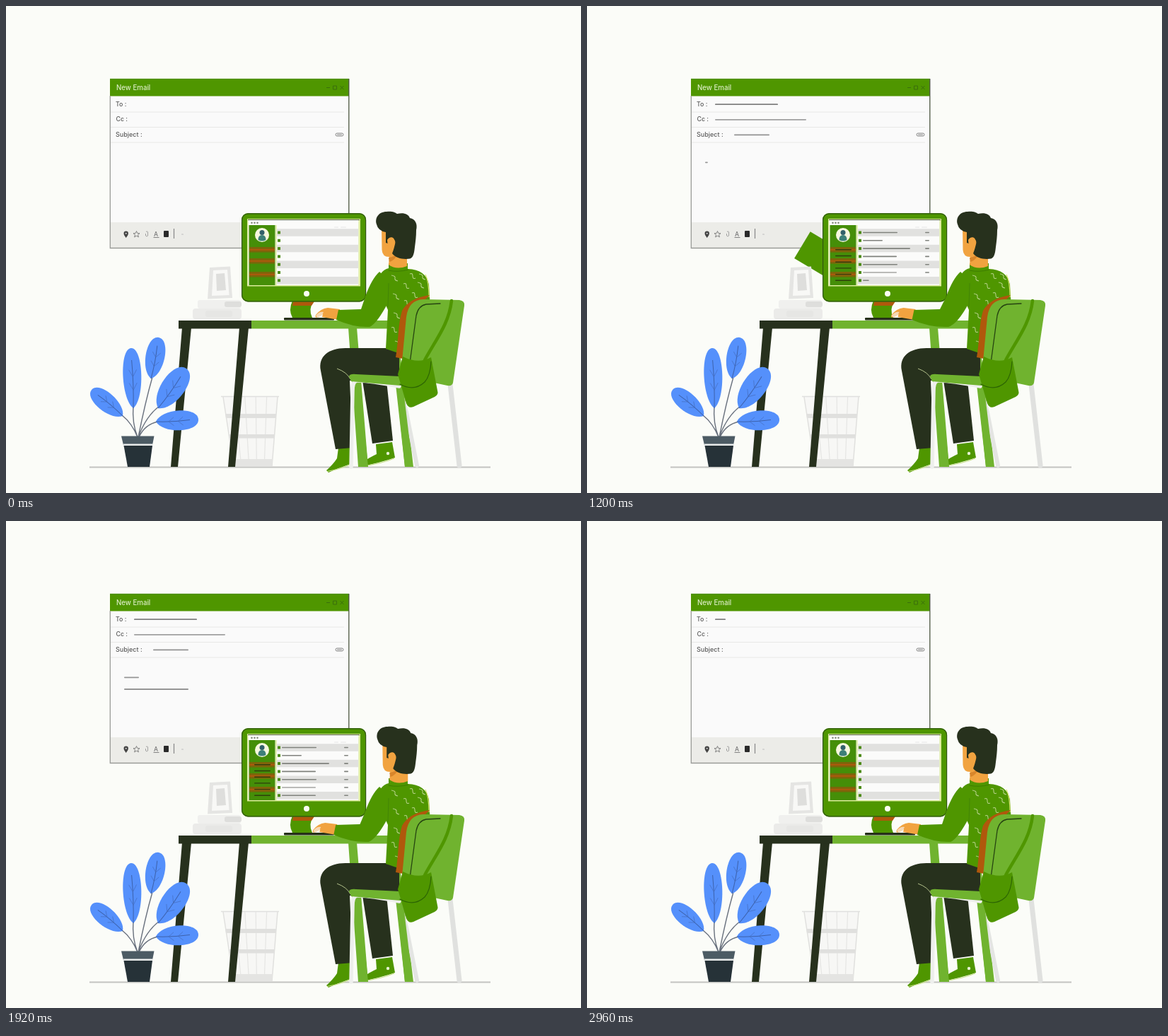
Write an HTML page with a canvas that moves like this. It is 813x689 px and loops after 3040 ms.

```html
<!DOCTYPE html>
<html lang="en">
<head>
<meta charset="utf-8">
<title>New Email</title>
<style>
html, body { margin: 0; width: 100%; height: 100%; overflow: hidden; background: #fbfcf8; }
canvas { display: block; width: 813px; height: 689px; }
</style>
</head>
<body>
<canvas id="stage" width="813" height="689"></canvas>
<script>
const ctx = document.getElementById('stage').getContext('2d');
const LOOP = 3040, STEP = 80, RESET = 2560;
const GREEN = '#4f9600', LIME = '#70b32f', DARK = '#27311d', SKIN = '#f1a340',
      BROWN = '#b0580c', PAPER = '#fbfcf8';

const clamp = v => Math.max(0, Math.min(1, v));
const prog = (t, from, to) => clamp((t - from) / (to - from));

// Smooth interpolation through [time, value] pairs
function track(t, keys) {
  for (let i = 1; i < keys.length; i++) {
    const [t0, a] = keys[i - 1], [t1, b] = keys[i];
    if (t <= t1) {
      const p = prog(t, t0, t1);
      return a + (b - a) * p * p * (3 - 2 * p);
    }
  }
  return keys[keys.length - 1][1];
}

function fill(d, color) {
  ctx.fillStyle = color;
  ctx.fill(new Path2D(d));
}
function stroke(d, color, width = 1) {
  ctx.strokeStyle = color;
  ctx.lineWidth = width;
  ctx.stroke(new Path2D(d));
}
function box(x, y, w, h, color, r = 0) {
  ctx.fillStyle = color;
  ctx.beginPath();
  ctx.roundRect(x, y, w, h, r);
  ctx.fill();
}
function disc(x, y, r, color) {
  ctx.fillStyle = color;
  ctx.beginPath();
  ctx.arc(x, y, r, 0, Math.PI * 2);
  ctx.fill();
}
function label(s, x, y, size, color) {
  ctx.font = `500 ${size}px Inter, "Open Sans", sans-serif`;
  ctx.fillStyle = color;
  ctx.fillText(s, x, y);
}
function dash(x, y, w, color = '#858585', h = 1.8) {
  if (w > 0.5) box(x, y - h / 2, w, h, color, h / 2);
}

function drawWindow(t) {
  box(147, 103, 338, 239, '#fafafa');
  box(147, 306, 338, 36, '#ecece8');
  box(147, 103, 338, 24.5, GREEN);
  stroke('M147 103.3H485', '#478a04', 1);
  stroke('M147.3 127V342.5H485', '#9a9b98', 1.3);
  stroke('M484.8 103V342', '#4a5540', 1.3);
  for (const y of [150, 171.5, 193]) stroke(`M148 ${y}H478`, '#e8e8e7', 1);

  label('New Email', 156, 118.5, 9.7, '#dcedc6');
  label('To :', 155, 141.5, 8.8, '#5c5c5c');
  label('Cc :', 155.5, 163, 8.8, '#5c5c5c');
  label('Subject :', 155, 185, 9, '#5c5c5c');
  stroke('M453 115.5h5M462.5 113h5v5h-5zM472.5 113l5 5m0-5l-5 5', '#3a6f0d', 1);
  stroke('M468 180h7a2 2 0 0 1 0 4h-7a2 2 0 0 1 0-4M468 182h7', '#888', 1);

  // toolbar icons
  fill('M169.7 328q-3.2-4-3.2-6.2a3.2 3.2 0 0 1 6.4 0q0 2.2-3.2 6.2z', '#444');
  disc(169.7, 321.7, 1, '#ddd');
  stroke('M184.5 318.5l1.3 3 3.2.2-2.5 2 .9 3.2-2.9-1.7-2.9 1.7.9-3.2-2.5-2 3.2-.2z', '#777', 0.9);
  stroke('M198 319.5q2-1.5 2.5.5v5q-1.5 2-3 0v-3', '#999', 0.9);
  label('A', 209, 325.5, 8.5, '#777');
  stroke('M208.5 327.5h8', '#777', 0.9);
  box(223, 318, 7, 9, '#2a2a2a', 1);
  stroke('M237.5 315V329', '#888', 1.2);
  dash(248, 323, 3, '#bbb', 1.2);

  const on = t < RESET;
  const to = on ? 89 * prog(t, 350, 560) : t >= 2800 ? 15 : 0;
  dash(181, 139.2, to, '#7f7f7f');
  if (!on) return;
  dash(181, 160.8, 129 * prog(t, 600, 830), '#a0a0a0');
  dash(t < 960 ? 205 : 208, 182.3, 50 * prog(t, 810, 1200), '#929292');
  dash(167, 221.3, 21 * prog(t, 1155, 1400), '#959595');
  dash(167, 238, 91 * prog(t, 1440, 1835), '#959595');
}

function card(x, y, w, h, angle, paint) {
  ctx.save();
  ctx.beginPath();
  ctx.rect(83, 150, 630, 400);
  ctx.clip();
  ctx.translate(x, y);
  ctx.rotate(angle);
  paint(w, h);
  ctx.restore();
}

function drawCards(t) {
  if (t >= 440 && t < 960) {
    const p = (t - 480) / 400;
    card(474 + 251 * p, 347 - 52 * p, 60, 45, -Math.PI / 4 * clamp(p), (w, h) => {
      box(-w / 2, -h / 2, w, h, PAPER);
      ctx.strokeStyle = '#c5d3aa';
      ctx.lineWidth = 1.2;
      ctx.strokeRect(-w / 2, -h / 2, w, h);
    });
    if (t >= 800) dash(704 - (880 - t) * 0.63, 291.5, 9, '#cfd2cc', 1.2);
  }
  if (t >= 1080 && t < 1600) {
    const p = (t - 1200) / 320;
    card(331 - 221 * p, 354 + 11 * p, 62, 44, 0.54, (w, h) => box(-w / 2, -h / 2, w, h, GREEN));
  }
}

function drawRoom() {
  stroke('M118 652.5H685', '#c3c4c1', 2);
  // books and picture frame
  box(264, 428, 69, 15, '#ebebe9', 4);
  box(271, 416, 61, 12, '#f0f0ee', 3);
  box(309, 418, 24, 8, '#dededc', 3);
  box(282, 431, 38, 9, '#e6e6e4', 3);
  fill('M288 370L317 368.5 320 413 285 414.5z', '#e5e5e3');
  fill('M293 374L313 373 315.5 409 291 410z', '#f8f8f6');
  fill('M297 379L309 378 311 402 298 403z', '#dededc');

  // waste basket
  fill('M307 553H384L376 651H323z', '#f7f7f5');
  stroke('M304 552.5H386M307 553L322 651H376L384 553', '#e0e0de', 1.5);
  for (let i = 1; i < 5; i++) stroke(`M${307 + 15.4 * i} 553L${322 + 10.8 * i} 651`, '#e5e5e3', 1.2);
  fill('M310 577H382L381.5 583H311zM315 606H380L379.5 611.5H316z', '#e0e0de');
  fill('M320 641H377L376 651H322z', '#e4e4e2');

  // desk
  fill('M249 455H262L243 652H233zM330 455H343L324 652H314z', DARK);
  fill('M484 455H496L512 652H498zM542 455H553L576 652H564z', LIME);
  box(244, 445, 103, 11.5, DARK);
  box(347, 445, 208, 11.5, LIME);
}

function leaf(x0, y0, x1, y1, w) {
  const dx = x1 - x0, dy = y1 - y0, n = Math.hypot(dx, dy), k = w * 0.69;
  ctx.save();
  ctx.translate(x0, y0);
  ctx.rotate(Math.atan2(dy, dx));
  fill(`M0 0C${n * .16} ${-k} ${n} ${-k} ${n} 0C${n} ${k} ${n * .16} ${k} 0 0`, '#5590fb');
  stroke(`M0 0Q${n * .4} 2 ${n * .8} 0`, '#3d62ac', 1);
  for (const f of [0.3, 0.52])
    stroke(`M${n * f} 1l${n * .12} ${-w * .22}M${n * f} 1l${n * .12} ${w * .22}`, '#456fc2', 0.7);
  ctx.restore();
}

function drawPlant() {
  stroke('M186 610Q178 590 164 579M186 610Q178 590 180 565M187 610Q197 560 207 525M187 610Q198 580 217 566M188 610Q196 592 215 588', '#69717e', 1.4);
  leaf(165, 580, 121, 543, 25);
  leaf(180, 569, 177, 484, 25);
  leaf(205, 527, 216, 469, 26);
  leaf(215, 569, 255, 513, 32);
  leaf(212, 588, 272, 585, 27);
  fill('M163 608.5H209.5L207 621H166z', '#4c5b64');
  fill('M166 619.5H207.5L207 622.5H166.5z', '#e7eaea');
  fill('M166.5 622H207L203 652H172z', '#263238');
}

function drawMonitor(t) {
  // stand
  fill('M405 417H435Q427 429 433 441H405Q399 430 405 417z', GREEN);
  fill('M406 418H436L432 424H405z', BROWN);
  box(393, 441, 71, 3.5, '#253018', 1);

  box(333, 293, 176, 125.5, GREEN, 9);
  ctx.strokeStyle = '#2f5510';
  ctx.lineWidth = 1.2;
  ctx.beginPath();
  ctx.roundRect(333.6, 293.8, 175, 124, 9);
  ctx.stroke();
  disc(425, 407, 4, '#fbfff2');

  box(341, 301, 160, 95.5, '#dcec9c');
  box(342.5, 302, 156, 93, '#fbfbfa');
  stroke('M342 302.5H500', '#4a5a3a', 1);
  for (let i = 0; i < 3; i++) disc(347.5 + i * 4, 306.7, 1.2, '#7b8373');
  dash(464, 313, 6, '#e6e6e5', 1);
  dash(473, 313, 8, '#e6e6e5', 1);

  box(343.5, 310, 37, 85, '#458e08');
  box(381, 310, 1.6, 85, '#dcec9c');
  disc(362, 324, 10, '#f7f7df');
  disc(362, 320.5, 3.5, '#32606a');
  fill('M356.500 331Q356.500 324 362 324T367.500 331Q362 334 356.500 331z', '#3d7f78');

  const on = t < RESET;
  for (const y of [341, 357, 376]) {
    box(344, y, 36, 7.5, '#7c650a');
    stroke(`M344 ${y + 3.8}H380`, BROWN, 2);
  }
  if (on) for (let i = 0; i < 6; i++)
    dash(351, 344.8 + i * 8.7, 23 * prog(t, 500 + i * 100, 580 + i * 100), '#2f3f0c', 1.4);

  const widths = [49, 28, 67, 48, 49, 48, 48];
  widths.forEach((w, i) => {
    const y = 320.5 + i * 11.3, p = prog(t, 340 + i * 140, 450 + i * 140);
    if (i % 2 === 0) box(383, y - 5.3, 115, 10.5, '#e1e1df');
    box(384, y - 2, 4, 4, '#4b8a13');
    if (on && p > 0) {
      dash(390, y, w * p, i === 5 ? '#a5a5a2' : '#80827d', 1.6);
      if (p === 1) dash(478, y, 6, '#80827d', 1.6);
    }
  });
}

function drawHead(dx) {
  ctx.save();
  ctx.translate(dx, 0);
  fill('M531 313L549 310 560 332 567 352V368Q552 374 541 366L542 355Q532 355 531.5 345z', SKIN);
  fill('M541 356Q549 355 554 350Q550 360 542 362z', '#d8862b');
  fill('M524 309C521 300 527 291 538 291C546 290 550 292 553 294C562 292 569 294 571 300C579 301 582 309 580 317C580 326 579 333 578 341C577 350 576 356 571 357.5C562 359 551 357 546 350C548 345 549 341 550 337C552 331 546 326 541 330L540 336 537 335V320Q526 318 524 309z', DARK);
  fill('M539 331C542 325 551 326 549 335C548 343 541 344 540 340z', SKIN);
  ctx.restore();
}

function drawMan(t) {
  const head = track(t, [[0, 0], [480, -1.5], [880, -1.5], [1200, 0], [1600, 2.5], [2240, 0], [LOOP, 0]]);
  const hand = track(t, [[0, 0], [480, 0], [880, -5], [1200, -7.5], [1600, -7.5], [2240, 0], [LOOP, 0]]);

  // far leg, shoes, near leg
  fill('M504 530H538L547 615 518 619z', DARK);
  fill('M523 620L546 617 550 639Q530 646 499 652Q503 644 524 634z', GREEN);
  disc(540, 633, 2.2, '#e7f2d2');
  fill('M470 625L486 625Q493 637 487 648L470 654 456 660 453 657Q463 648 468 640z', GREEN);
  stroke('M454 658.5Q474 655 488 648M503 651Q530 648 549 640', '#c6df8b', 1.2);
  fill('M556 484H480C456 484 441 496 445 516L466 627 490 625 486 530 556 526z', DARK);
  stroke('M468 513Q482 518 487 528', '#b3c18c', 1);

  // torso
  fill('M541 364H568V372Q594 373 598 394L600 430 575 498 537 485 540 430 524 394Q528 374 541 371z', GREEN);
  stroke('M540.5 374Q554 377 569 373', '#3d7d00', 1);
  stroke('M593 380Q598 390 598 412', '#d5e36b', 1.2);
  const marks = [[547, 381], [571, 379], [584, 391], [562, 393], [549, 407], [574, 406], [550, 434], [545, 455], [552, 474], [563, 417], [586, 379]];
  marks.forEach(([x, y], i) => stroke(i % 2 ? `M${x} ${y}q4-2 4 3t4 3` : `M${x - 2} ${y}q6 1 5 4t4 4`, '#b5d188', 1.1));

  // hand and sleeve
  ctx.save();
  ctx.translate(hand, 0);
  fill('M472 429L455 427Q445 428 438 437Q436 442 441 440L448 436 447 440 470 444z', SKIN);
  fill('M438 438Q443 432 449 433L447 437 441 441z', '#f6d8b4');
  ctx.restore();
  fill(`M528 376Q517 386 508 411L${502 + hand * .4} 429 ${470 + hand} 430 ${467 + hand} 444Q${492 + hand} 455 ${514 + hand * .4} 454Q524 450 540 420L543 390z`, GREEN);
  stroke('M541 392L540 426', '#438606', 1);
  drawHead(head);
}

function drawChair() {
  ctx.lineCap = 'round';
  ctx.lineJoin = 'round';
  // legs, rear to front
  stroke('M628 535L641 650', '#e0e1df', 7);
  stroke('M556 540L566 575 581 650', '#e4e5e3', 6);
  fill('M552 535L561 535 575 652H564z', LIME);
  fill('M491 530L500 530 512 652H499z', LIME);
  stroke('M556 538Q510 529 496 530Q490 531 490 545L488 652', '#eeefed', 5.5);
  fill('M485 524Q486 520 495 521L558 524V537Q520 534 488 531z', LIME);

  // backrest
  fill('M599 409Q570 413 560 431C554 450 555 476 551 497L566 500 584 424z', BROWN);
  fill('M590 415L641 416Q649 417 648 424L632 533Q631 538 624 537L558 523 566 440Q569 416 590 415z', LIME);
  stroke('M614 421L594 422Q583 424 580 438L571 505', '#264411', 1.3);
  stroke('M630 417C626 450 609 470 592 501', GREEN, 4.5);
  fill('M561 496Q583 507 601 497L610 544Q612 550 606 553L576 567Q569 570 566 562L554 521z', GREEN);
  stroke('M557 535Q577 546 592 532Q600 523 601 503', '#2d6504', 1.2);
  ctx.lineCap = 'butt';
  ctx.lineJoin = 'miter';
}

function draw(t) {
  ctx.fillStyle = PAPER;
  ctx.fillRect(0, 0, 813, 689);
  drawWindow(t);
  drawCards(t);
  drawRoom();
  drawPlant();
  drawMonitor(t);
  drawMan(t);
  drawChair();
}

const start = performance.now();
function tick() {
  const t = (performance.now() - start) % LOOP;
  draw(Math.floor(t / STEP) * STEP);
  requestAnimationFrame(tick);
}
tick();
</script>
</body>
</html>
```
